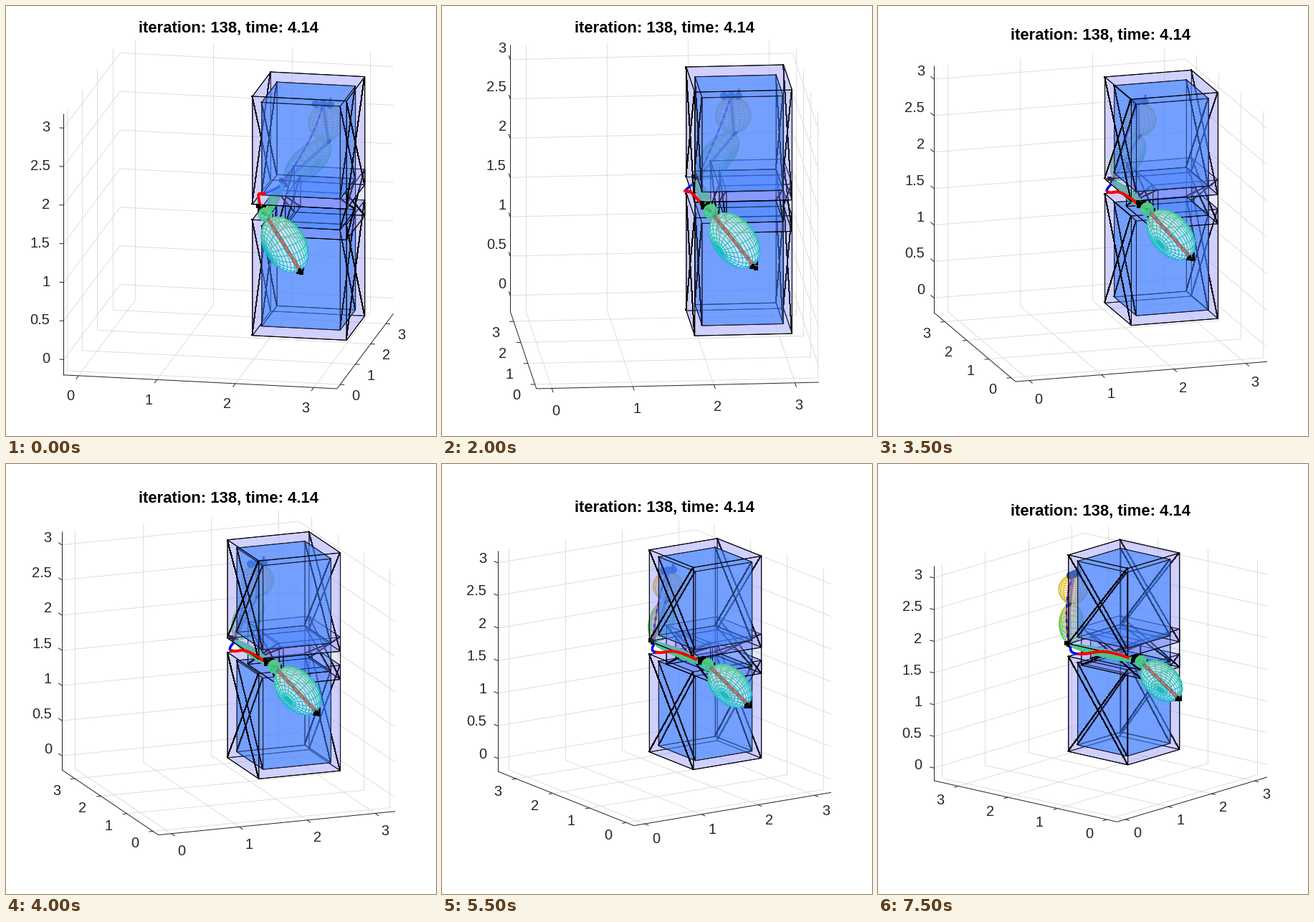
Recreate the animation shown at these times as a matplotlib script. Size 600x600 px, loop 8 s.

```python
import itertools

import matplotlib.pyplot as plt
import numpy as np
from matplotlib.animation import FuncAnimation
from matplotlib.collections import LineCollection, PolyCollection
from matplotlib.colors import LinearSegmentedColormap

SIZE, DPI, FRAMES, STEP_MS = 600, 100, 16, 500
PX = 72 / DPI
plt.rcParams["font.family"] = "Liberation Sans"

LO = np.array([-0.19, -0.207, -0.2])
HI = np.array([3.295, 3.493, 3.19])
MID, SPAN = (LO + HI) / 2, HI - LO
RECT_W, RECT_H = 465, 489
CX, CY = 310.5, 289.5
ELEV = np.radians(15)
INK = (0.15, 0.15, 0.15)

parula = LinearSegmentedColormap.from_list("heights", [
    (0.0, "#3e26a8"), (0.25, "#2e87f7"), (0.4, "#1caadf"), (0.5, "#12beb9"),
    (0.6, "#48cb86"), (0.7, "#9dc943"), (0.8, "#eaba30"), (0.9, "#fed62e"),
    (1.0, "#f9fb15")])

# obstacles: inner size, the outer shell is 0.1 larger on every side
LOWER = ([2.0, 1.5, 0.1], [3.0, 2.5, 1.4])
MIDDLE = ([2.3, 1.5, 1.4], [3.0, 2.5, 1.8])
UPPER = ([2.0, 1.5, 1.8], [3.0, 2.5, 3.0])
SHELL, CORE = (0.5, 0.5, 1.0), (0.185, 0.52, 1.0)

# joints of the chain
TAIL = np.array([2.59, 0.98, 0.99])
WRIST = np.array([2.09, 1.295, 1.60])
HUB = np.array([2.025, 1.354, 1.66])
ELBOW = np.array([2.04, 2.71, 1.63])
NECK = np.array([2.54, 3.13, 2.08])
HEAD = np.array([2.52, 3.04, 2.35])
CROWN = np.array([2.49, 3.0, 2.61])


def unit(v):
    v = np.asarray(v, float)
    return v / np.linalg.norm(v)


def smooth(points, n=40):
    """Polynomial curve through a few points."""
    points = np.asarray(points)
    t = np.linspace(0, 1, len(points))
    s = np.linspace(0, 1, n)
    return np.stack([np.polyval(np.polyfit(t, c, len(t) - 1), s)
                     for c in points.T], axis=1)


CORNER = [1.87, 2.35, 1.585]
RED_PATH = smooth([CORNER, [1.875, 2.1, 1.645], [1.896, 1.85, 1.70],
                   [1.99, 1.47, 1.657]])
BLUE_TURN = smooth([CORNER, [1.91, 2.52, 1.57], [2.0, 2.64, 1.60]])
BLUE_PATH = smooth([ELBOW, [2.33, 3.0, 2.15], CROWN])


def ellipsoid(center, axis, pole, major, minor, n=20):
    """Quads of an ellipsoid, long along axis, meshed around pole."""
    d = unit(axis)
    p = unit(np.asarray(pole) - np.dot(pole, d) * d)
    q = np.cross(p, d)
    lon, lat = np.meshgrid(np.linspace(0, 2 * np.pi, n + 1),
                           np.linspace(-np.pi / 2, np.pi / 2, n + 1))
    grid = (np.asarray(center)
            + major * (np.cos(lat) * np.cos(lon))[..., None] * d
            + minor * (np.cos(lat) * np.sin(lon))[..., None] * q
            + minor * np.sin(lat)[..., None] * p)
    quads = np.stack([grid[:-1, :-1], grid[:-1, 1:], grid[1:, 1:],
                      grid[1:, :-1]], axis=2)
    return quads.reshape(-1, 4, 3)


BODY = ellipsoid([2.37, 1.125, 1.27], TAIL - WRIST, [-0.67, -0.62, -0.38],
                 0.387, 0.258)
BALL = ellipsoid(WRIST, [1, 0, 0], [0, 0, 1], 0.085, 0.085, 12)
ARM = ellipsoid((ELBOW + WRIST) / 2, WRIST - ELBOW, [0, 0, 1], 0.68, 0.06, 16)
TORSO = ellipsoid((ELBOW + NECK) / 2 + [0.03, -0.02, 0.02], NECK - ELBOW,
                  [-0.6, 0.6, 0], 0.37, 0.185)
SKULL = ellipsoid(HEAD, [1, 0, 0], [0, 0, 1], 0.22, 0.22)


class View:
    def __init__(self, azimuth):
        self.az = azimuth
        a = np.radians(azimuth)
        c, s, se, ce = np.cos(a), np.sin(a), np.sin(ELEV), np.cos(ELEV)
        self.right = np.array([c, s, 0])
        self.up = np.array([-s * se, c * se, ce])
        self.eye = np.cross(self.right, self.up)
        self.height = SPAN @ np.abs(self.up)
        self.scale = min(RECT_W / (SPAN @ np.abs(self.right)),
                         RECT_H / self.height)
        self.top = CY - self.height * self.scale / 2

    def __call__(self, pts):
        d = np.asarray(pts, float) - MID
        return np.stack([CX + self.scale * (d @ self.right),
                         CY - self.scale * (d @ self.up)], axis=-1)


fig = plt.figure(figsize=(SIZE / DPI, SIZE / DPI), dpi=DPI, facecolor="white")
ax = fig.add_axes([0, 0, 1, 1])
order = itertools.count(1)


def lines(segs, color, width=1.0, smooth_edges=True):
    ax.add_collection(LineCollection(segs, colors=[color],
                                     linewidths=width * PX,
                                     antialiaseds=smooth_edges,
                                     zorder=next(order)))


def path(view, pts, color, width, **kw):
    xy = view(pts)
    ax.plot(xy[:, 0], xy[:, 1], color=color, lw=width * PX,
            zorder=next(order), **kw)


def dots(view, pts, color, size, marker):
    xy = view(pts)
    ax.plot(xy[:, 0], xy[:, 1], marker, color=color, ms=size * PX, mew=0,
            zorder=next(order))


def label(x, y, text, size=20, ha="center", **kw):
    ax.text(x, y, text, fontsize=size * PX, ha=ha, va="baseline",
            zorder=next(order), **kw)


def mesh(view, quads, alpha=0.6, width=0.9):
    xy = view(quads)
    a, b = xy[:, 2] - xy[:, 0], xy[:, 3] - xy[:, 1]
    front = a[:, 0] * b[:, 1] - a[:, 1] * b[:, 0]
    # quads share one winding, so the nearest one tells which sign is visible
    near = np.argmax(quads.mean(axis=1) @ view.eye)
    keep = front * np.sign(front[near]) > 0
    z = quads[keep].mean(axis=1)[:, 2]
    ax.add_collection(PolyCollection(
        xy[keep], facecolors=[(1, 1, 1, alpha)],
        edgecolors=parula(0.19 + 0.25 * z), linewidths=width * PX,
        zorder=next(order)))


def box_faces(lo, hi):
    """Yield axis number, outward normal and corners of each face."""
    for i, side in itertools.product(range(3), (0, 1)):
        j, k = (i + 1) % 3, (i + 2) % 3
        quad = np.empty((4, 3))
        quad[:, i] = (lo, hi)[side][i]
        quad[:, j] = [lo[j], hi[j], hi[j], lo[j]]
        quad[:, k] = [lo[k], lo[k], hi[k], hi[k]]
        normal = np.zeros(3)
        normal[i] = 2 * side - 1
        yield i, normal, quad


def shell(view, lo, hi, color, front):
    for i, normal, quad in box_faces(lo, hi):
        if (normal @ view.eye > 0) != front:
            continue
        xy = view(quad)
        ax.add_collection(PolyCollection([xy], facecolors=[color],
                                         edgecolors="black", linewidths=PX,
                                         antialiaseds=False,
                                         zorder=next(order)))
        if i == 0:
            lines([xy[[0, 2]], xy[[1, 3]]], "black", 1, False)


def obstacle(view, inner, density=1.0):
    lo, hi = np.array(inner[0]), np.array(inner[1])
    outer = (lo - 0.1, hi + 0.1, (*SHELL, 0.2 * density))
    core = (lo, hi, (*CORE, 0.4 * density))
    shell(view, *outer, False)
    shell(view, *core, False)
    shell(view, *core, True)
    shell(view, *outer, True)


def draw_axes(view):
    flat = abs(view.az) < 4
    pos = view.az > 0
    xs = np.arange(0, 3.1, 0.5 if flat else 1)
    ys = np.arange(0, 3.1, 1)
    zs = np.arange(0, 3.1, 0.5)
    (x0, y0, z0), (x1, y1, z1) = LO, HI
    wall = x0 if pos else x1
    grid = []
    for x in xs:
        grid += [[(x, y0, z0), (x, y1, z0)], [(x, y1, z0), (x, y1, z1)]]
    for y in ys:
        grid += [[(x0, y, z0), (x1, y, z0)], [(wall, y, z0), (wall, y, z1)]]
    for z in zs:
        grid += [[(x0, y1, z), (x1, y1, z)], [(wall, y0, z), (wall, y1, z)]]
    lines(view(grid), (0.87, 0.87, 0.87))

    yx = x1 if pos else x0
    zy = y0 if pos else y1
    lines(view([[(x0, y0, z0), (x1, y0, z0)], [(yx, y0, z0), (yx, y1, z0)],
                [(x0, zy, z0), (x0, zy, z1)]]), INK)

    def ticks(values, place, out, reach, drop, ha, shift=0):
        step = unit(view(MID + np.array(out)) - view(MID))
        for v in values:
            p = view(place(v))
            lines([[p, p + 6 * step]], INK)
            q = p + reach * step
            label(q[0] + shift, q[1] + drop + 7, f"{v:g}", ha=ha, color=INK)

    ticks(xs, lambda v: (v, y0, z0), (0, -1, 0), 17, 14, "center",
          -1 if pos else 0)
    ticks(ys, lambda v: (yx, v, z0), (1 if pos else -1, 0, 0), 17,
          0 if flat else 14, "left" if pos else "right",
          -1 if pos else -3)
    ticks(zs, lambda v: (x0, zy, v), (-1, 0, 0) if pos else (0, 1, 0),
          19 if pos else 17, -1, "right", 0)


def draw_back(view):
    path(view, np.array([ELBOW, NECK, CROWN]), "#58585c", 4)
    mesh(view, TORSO, 0.5)
    mesh(view, SKULL, 0.5)
    path(view, np.array([ELBOW, NECK, CROWN]), (0.35, 0.35, 0.37, 0.55), 4)
    path(view, BLUE_PATH, "#e03030", 2)
    path(view, BLUE_PATH, "#1818f0", 2.6, ls=(0, (2, 2)))
    dots(view, ELBOW + np.array([[0, 0, 0], [-.03, .02, .03], [.03, 0, -.02]]),
         "black", 6, "s")
    dots(view, NECK + np.array([[0, 0, 0], [0.02, 0, 0.02]]), "#202028", 4,
         "s")
    dots(view, CROWN + np.outer([-1, 0, 1], [0.09, 0, 0]), "#1f5591", 11, "o")
    path(view, CROWN + np.array([[.08, 0, -.04], [.1, 0, .07]]), "#203050", 3)


def draw_front(view):
    path(view, RED_PATH, "#ff0000", 4)
    path(view, np.array([HUB, WRIST]), "black", 4)
    cluster = np.array([[-.035, 0, .03], [.035, 0, .025], [0, 0, 0],
                        [.03, -.02, -.035], [-.02, .02, -.03]])
    dots(view, HUB + cluster, "black", 6.5, "s")
    dots(view, WRIST + [[0.07, -0.02, -0.02]], "black", 8, "s")
    mesh(view, BALL, 0.3, 1.3)
    dots(view, TAIL + cluster * 0.9, "black", 6, "s")
    mesh(view, BODY, 0.68)
    link = np.array([WRIST + 0.1 * (TAIL - WRIST), TAIL])
    path(view, link, (0.45, 0.43, 0.42, 0.9), 5)
    path(view, link, "#f07060", 1.8, ls=(0, (4, 2)))
    dots(view, TAIL + cluster[2:] * 0.8, "black", 5, "s")


def draw(i):
    global order
    order = itertools.count(1)
    ax.clear()
    ax.set(xlim=(0, SIZE), ylim=(SIZE, 0))
    ax.axis("off")
    view = View(11 - 4 * i)
    draw_axes(view)
    draw_back(view)
    obstacle(view, LOWER)
    obstacle(view, MIDDLE, 0.5)
    mesh(view, ARM, 0.3)
    path(view, BLUE_TURN, "#0000ff", 3.5)
    obstacle(view, UPPER)
    draw_front(view)
    label(CX, view.top - 8, "iteration: 138, time: 4.14", 22,
          weight="bold", color="black")
    return []


anim = FuncAnimation(fig, draw, frames=FRAMES, init_func=lambda: [],
                     interval=STEP_MS, repeat=True, repeat_delay=0)
plt.show()
```
